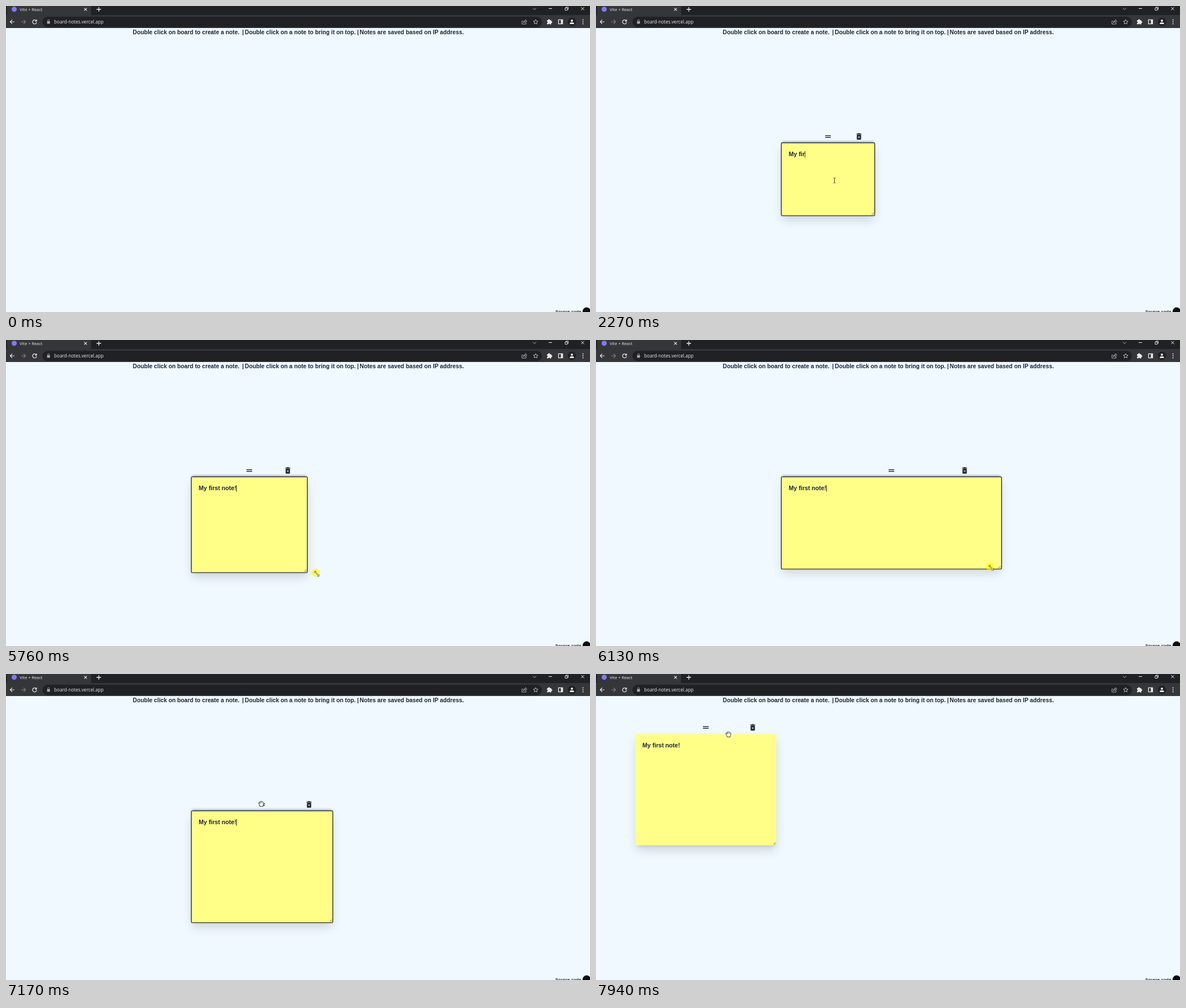
Recreate the animation shown at these times as an HTML page with a canvas. Size 1032 px wide and 542 px high, loop 8000 ms.

```html
<!DOCTYPE html>
<html lang="en">
<head>
<meta charset="utf-8">
<title>Board notes</title>
<style>
html, body { margin: 0; width: 100%; height: 100%; overflow: hidden; background: #f0f9ff; }
canvas { display: block; }
</style>
</head>
<body>
<canvas id="stage" width="1032" height="542"></canvas>
<script>
const ctx = document.getElementById('stage').getContext('2d');
const LOOP = 8000;
const INK = '#1b2536', LIGHT = '#e8eaed', BAR = '#35363a', DARK = '#202124';
const PAGE = '#f0f9ff', PAPER = '#ffff88';
const HAND = 'px "Liberation Sans", Arial, sans-serif';
const UI = 'px "Open Sans", "Noto Sans", sans-serif';

// Moments in ms; SIZE and DRAG are spans with the button held down.
const ENTER = 70, CREATE = 600, FOCUS = 1000;
const SIZE = [5300, 6820], DRAG = [7240, 7800];
const LAG = 100, KEY_GAP = 132;
const NOTE = { x: 328, y: 243, w: 164, h: 128 };

// Bursts of typing and when each begins.
const BURSTS = { 'My fir': 1610, 'st': 2470, ' ': 2800, 'no': 3220, 'te': 3550, '!': 4080 };

// Where the pointer stops or turns: [time, x, y].
const POINTER = [
  [ENTER, 640, 548], [400, 405.5, 279], [740, 405.5, 279], [900, 421.5, 309],
  [4590, 421.5, 309], [5100, 489, 368], [SIZE[0], 489, 368],
  [5760, 549, 414], [6060, 717, 402], [6500, 450, 429], [6780, 574, 437], [SIZE[1], 574, 437],
  [7120, 451, 230], [DRAG[0], 451, 230], [7760, 192.5, 93.5], [DRAG[1], 192.5, 93.5], [7940, 234, 107]
];

const within = (t, a, b) => t >= a && t < b;
const clamp = (v, a, b) => Math.min(b, Math.max(a, v));

// Monotone cubic through the points; still at both ends.
function track(pts, t) {
  const last = pts.length - 1;
  t = clamp(t, pts[0][0], pts[last][0]);
  let i = 0;
  while (i < last - 1 && t >= pts[i + 1][0]) i++;
  const slope = (k, c) => (pts[k + 1][c] - pts[k][c]) / (pts[k + 1][0] - pts[k][0]);
  const tangent = (k, c) => {
    if (k === 0 || k === last) return 0;
    const a = slope(k - 1, c), b = slope(k, c);
    return a * b <= 0 ? 0 : 2 * a * b / (a + b);
  };
  const h = pts[i + 1][0] - pts[i][0], u = (t - pts[i][0]) / h;
  return [1, 2].map(c => {
    const p = pts[i][c], q = pts[i + 1][c];
    return p + (q - p) * u * u * (3 - 2 * u)
      + h * u * (1 - u) * ((1 - u) * tangent(i, c) - u * tangent(i + 1, c));
  });
}

// How far something held during a span has trailed after the pointer.
function pulled(t, [from, to]) {
  const a = track(POINTER, from), b = track(POINTER, clamp(t - LAG, from, to));
  return [b[0] - a[0], b[1] - a[1]];
}

function typedText(t) {
  return Object.entries(BURSTS).map(([str, from]) =>
    str.slice(0, Math.max(0, Math.floor((t - from) / KEY_GAP) + 1))).join('');
}

function rect(x, y, w, h, color) {
  ctx.fillStyle = color;
  ctx.fillRect(x, y, w, h);
}
function disc(x, y, r, color) {
  ctx.fillStyle = color;
  ctx.beginPath();
  ctx.arc(x, y, r, 0, 7);
  ctx.fill();
}
function rounded(x, y, w, h, r, color) {
  ctx.fillStyle = color;
  ctx.beginPath();
  ctx.roundRect(x, y, w, h, r);
  ctx.fill();
}
function text(str, x, y, font, color) {
  ctx.font = font;
  ctx.fillStyle = color;
  ctx.fillText(str, x, y);
}
function stroke(d, x, y, color, width = 1, fill) {
  ctx.save();
  ctx.translate(x, y);
  const path = new Path2D(d);
  if (fill) {
    ctx.fillStyle = fill;
    ctx.fill(path);
  }
  ctx.strokeStyle = color;
  ctx.lineWidth = width;
  ctx.stroke(path);
  ctx.restore();
}
const cross = (x, y, r, color, width) =>
  stroke(`M${-r} ${-r}L${r} ${r}M${r} ${-r}L${-r} ${r}`, x, y, color, width);

function drawArrow(x, dir, color) {
  stroke(`M${-4 * dir} 0H${3.5 * dir}M0-3.6L${3.6 * dir} 0L0 3.6`, x, 28, color, 1.2);
}

function drawStar(x, y) {
  ctx.beginPath();
  for (let i = 0; i < 10; i++) {
    const r = i % 2 ? 2 : 4.3, a = i * Math.PI / 5;
    ctx.lineTo(x + r * Math.sin(a), y - r * Math.cos(a));
  }
  ctx.closePath();
  ctx.strokeStyle = '#c6c9cc';
  ctx.lineWidth = 0.9;
  ctx.stroke();
}

function drawBrowser() {
  rect(0, 0, 1032, 16, DARK);
  rect(0, 16, 1032, 23, BAR);
  rounded(2, -8, 148.5, 26, 4, BAR);
  disc(14.5, 5.8, 4.5, '#8478f5');
  text('Vite + React', 24.3, 9, 7.4 + UI, LIGHT);
  cross(140.5, 6, 2.4, LIGHT, 1.1);
  stroke('M-4 0H4M0-4V4', 164, 6, LIGHT, 1.3);
  stroke('M-3-1.5L0 1.5L3-1.5', 934, 5, '#b5b7ba');
  stroke('M-3 0H3', 962, 4.5, LIGHT);
  stroke('M-2.5-1H1.5V3H-2.5ZM-1-1V-2.5H3V1.5H1.5', 990.5, 4.5, LIGHT, 0.9);
  cross(1019, 4.7, 2.7, LIGHT);

  drawArrow(11, -1, LIGHT);
  drawArrow(31, 1, '#7f8184');
  stroke('M2.6-2.4A3.6 3.6 0 1 0 3.6 .6', 50.5, 28, LIGHT, 1.2);
  stroke('M3.8-4V-.8H.6Z', 50.5, 28, LIGHT, 0.4, LIGHT);

  rounded(64.5, 19, 882.5, 18.5, 9.2, DARK);
  rect(72.6, 27, 5, 4.4, '#a9acb0');
  stroke('M-1.4 0V-1.4A1.4 1.4 0 0 1 1.4-1.4V0', 75.1, 27, '#a9acb0', 0.9);
  text('board-notes.vercel.app', 85, 31, 8.15 + UI, LIGHT);

  stroke('M-2.5-1.5H-4.2V4H3V2M-2 1.5Q-1.5-2 2-2V-4L4.5-1L2 1.6V0Q-.5-.2-2 1.5Z', 916, 28, '#b9bcc0', 0.9);
  drawStar(936, 28.3);

  rounded(956, 25, 7.6, 7.6, 0.8, LIGHT);
  disc(959.6, 24.8, 1.5, LIGHT);
  disc(963.8, 28.6, 1.5, LIGHT);
  disc(956.2, 28.9, 1.2, BAR);
  disc(959.8, 32.6, 1.2, BAR);

  stroke('M-3.6-3.6H3.6V3.6H-3.6Z', 980, 28, LIGHT, 1.3);
  rect(980.6, 24.4, 3.4, 7.2, LIGHT);
  disc(1000, 28, 7.3, DARK);
  disc(1000, 26, 2, LIGHT);
  rounded(996.2, 28.9, 7.6, 3, [2.4, 2.4, 0.4, 0.4], LIGHT);
  for (let i = -1; i < 2; i++) disc(1019.6, 28 + i * 3.4, 1, LIGHT);
}

function drawPage(selected) {
  rect(0, 39, 1032, 503, PAGE);
  const font = 'bold 10.25' + HAND;
  text('Double click on board to create a note.', 224, 50, font, INK);
  text('|', 417.2, 50, font, INK);
  text('Double click on a note to bring it on top.', 422, 50, font, INK);
  text('|', 620.4, 50, font, INK);
  text('Notes are saved based on IP address.', 625, 50, font, INK);

  const small = 'bold 7.5' + HAND;
  if (selected) rect(970, 537, 28, 5, '#3390ff');
  text('Source', 970.8, 543.8, small, selected ? '#fff' : INK);
  text('code', 998.8, 543.8, small, INK);
  disc(1026, 541, 7.2, '#0b0d12');
}

function castShadow(x, y, w, h, dy, blur, shrink, alpha) {
  ctx.save();
  ctx.shadowColor = `rgba(0,0,0,${alpha})`;
  ctx.shadowBlur = blur;
  ctx.shadowOffsetY = dy;
  rect(x + shrink, y + shrink, w - 2 * shrink, h - 2 * shrink, PAPER);
  ctx.restore();
}

function drawTrash(x, y) {
  rounded(x - 3.8, y - 3.2, 7.6, 9, 1.1, INK);
  rect(x - 4.4, y - 5, 8.8, 1.3, INK);
  rect(x - 1.8, y - 5.8, 3.6, 1, INK);
  cross(x, y + 1.3, 1.6, PAGE, 1);
}

function drawNote(t) {
  const [dx, dy] = pulled(t, DRAG), [dw, dh] = pulled(t, SIZE);
  const x = NOTE.x + dx, y = NOTE.y + dy, w = NOTE.w + dw, h = NOTE.h + dh;
  const focused = within(t, FOCUS, DRAG[0]);

  rect(x + w / 2 - 5, y - 14, 10, 1.4, INK);
  rect(x + w / 2 - 5, y - 11, 10, 1.4, INK);
  drawTrash(x + w * 5 / 6, y - 12);

  castShadow(x, y, w, h, 9, 17, 1, 0.15);
  castShadow(x, y, w, h, 4.3, 5.4, 3.2, 0.1);
  if (focused) castShadow(x, y, w, h, -3, 4, 1, 0.55);
  rect(x, y, w, h, PAPER);
  stroke('M-5.2-1L-1-5.2M-2.6-1L-1-2.6', x + w, y + h, '#55553a', 0.8);
  if (focused) {
    ctx.strokeStyle = '#101010';
    ctx.lineWidth = 1.1;
    ctx.beginPath();
    ctx.roundRect(x - 0.5, y - 0.5, w + 1, h + 1, 1.4);
    ctx.stroke();
  }

  const typed = typedText(t);
  text(typed, x + 12.5, y + 23, 'bold 10.6' + HAND, INK);
  if (focused && !within(t, 4590, 5120)) {
    rect(x + 12.5 + ctx.measureText(typed).width, y + 14, 0.9, 11.5, '#111');
  }
}

function drawHand(x, y, closed) {
  const open = 'M-2.2 4.6Q-3-.1-5-.8Q-5.3-2.2-3.6-1.6L-2.6-.6L-3.2-3.4Q-2.6-4.6-1.8-3.4'
    + 'Q-1.2-5.6-.2-4.2Q.8-5.4 1.5-3.8Q2.8-4.6 3.3-2.6Q4.6-2.9 4.4-1L3.2 2.6V4.6Z';
  const fist = 'M-2.2 4.4L-3.8 1.4Q-4-.4-2.8-.4Q-3-2.6-1.6-2.2Q-.8-3.4 .2-2.4Q1.2-3.2 2-2Q3.6-2.4 3.8 0L3 2.8V4.4Z';
  stroke(closed ? fist : open, x, y, '#111', 0.8, '#fff');
  if (!closed) stroke('M-1.6-3V-.5M0-3.6V-.6M1.7-3.2V-.5', x, y, '#333', 0.5);
}

function drawPointer(t) {
  const [x, y] = track(POINTER, t);
  const click = [430, 550, 960].some(from => within(t, from, from + 80));
  const sizing = within(t, SIZE[0] - 200, SIZE[1]);
  const dragging = within(t, ...DRAG);
  const shift = sizing ? 2 : 0;
  if (click || dragging || within(t, ...SIZE)) disc(x - shift, y - shift, 7.3, 'rgba(255,250,0,.62)');

  if (t < CREATE) {
    stroke('M0 0V9.4L2.2 7.4L3.6 10.4L5 9.8L3.7 6.9H6.7Z', x, y, '#111', 0.7, '#fff');
  } else if (sizing) {
    stroke('M-4-1.5V-4.5H-1L-2-3.5L3 2L4 1V4.5H.8L1.8 3.4L-3-2.5Z', x, y, '#55552c', 0.8, '#f7f7c8');
  } else if (t < 7060) {
    stroke('M-2-4.3H-.6L0-3.8L.6-4.3H2M0-3.8V3.8M-2 4.3H-.6L0 3.8L.6 4.3H2', x, y, '#35351c', 0.9);
  } else {
    drawHand(x, y, dragging);
  }
}

function draw(t) {
  drawPage(within(t, CREATE, FOCUS));
  if (t >= CREATE) drawNote(t);
  drawBrowser();
  if (t >= ENTER) drawPointer(t);
}

const start = performance.now();
function tick() {
  draw((performance.now() - start) % LOOP);
  requestAnimationFrame(tick);
}
tick();
</script>
</body>
</html>
```
